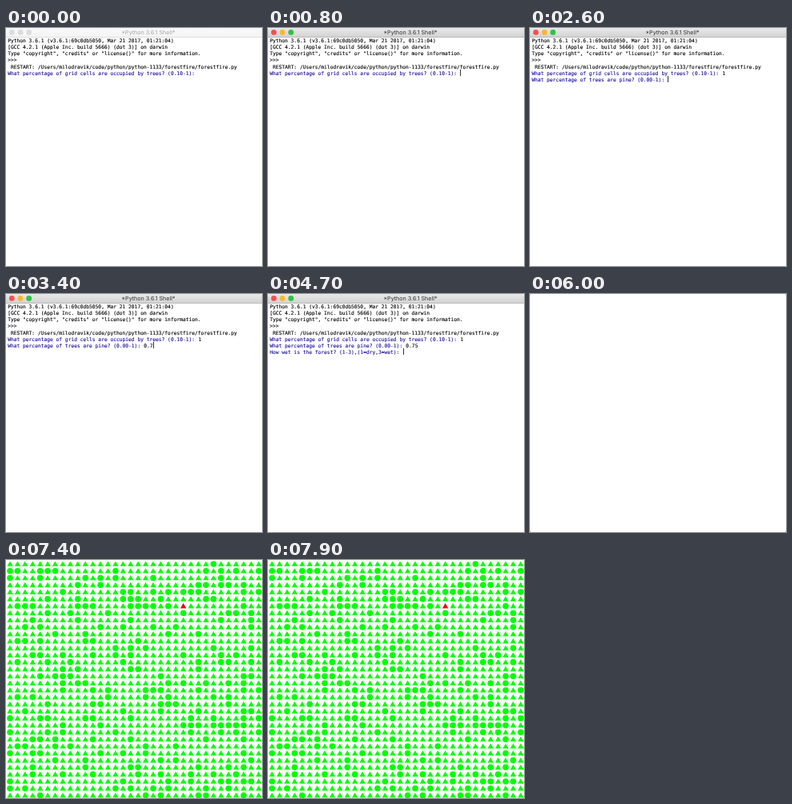
Write an HTML page with a canvas that moves like this. It is 320 by 298 pixels and loops after 8000 ms.

```html
<!DOCTYPE html>
<html lang="en">
<head>
<meta charset="utf-8">
<title>Forest fire</title>
<style>
  html, body { margin: 0; width: 100%; height: 100%; overflow: hidden; background: #fff; }
  canvas, svg { position: absolute; left: 0; top: 0; width: 320px; height: 298px; display: block; }
  text { white-space: pre; text-rendering: geometricPrecision; }
  .mono { font: 6.28px "DejaVu Sans Mono", "Liberation Mono", monospace; stroke-width: 0.12px; }
  .title { font: 7.15px Inter, Roboto, sans-serif; text-anchor: middle; }
</style>
</head>
<body>
<canvas id="stage" width="320" height="298"></canvas>
<svg id="shell" viewBox="0 0 320 298" xmlns="http://www.w3.org/2000/svg"></svg>
<script>
const W = 320, H = 298, LOOP = 8000;
const CHAR = 6.28 * 0.602, LEFT = 2.2, BASE = 18.3, LINE = 8.06;
const FOCUS = 500, CLEAR = 6000, FOREST = 6900;
const INK = "#000", BLUE = "#1a109c", GREEN = "#0f0", FIRE = "#f00014";

const ctx = document.getElementById("stage").getContext("2d");
const shell = document.getElementById("shell");

const banner = [
  "Python 3.6.1 (v3.6.1:69c0db5050, Mar 21 2017, 01:21:04)",
  "[GCC 4.2.1 (Apple Inc. build 5666) (dot 3)] on darwin",
  'Type "copyright", "credits" or "license()" for more information.',
  ">>>",
  " RESTART: /Users/milodravik/code/python/python-1133/forestfire/forestfire.py"
];

// Each prompt appears at `at`; its answer is typed key by key.
const prompts = [
  { at: 0, ask: "What percentage of grid cells are occupied by trees? (0.10-1): ", answer: "1", keys: [1100] },
  { at: 1600, ask: "What percentage of trees are pine? (0.00-1): ", answer: "0.75", keys: [2700, 3000, 3300, 3600] },
  { at: 4200, ask: "How wet is the forest? (1-3),(1=dry,3=wet): ", answer: "2", keys: [5000] },
  { at: 5500, ask: "", answer: "", keys: [] }
];

function addText(str, x, y, cls, fill) {
  const el = document.createElementNS("http://www.w3.org/2000/svg", "text");
  el.setAttribute("x", x);
  el.setAttribute("y", y);
  el.setAttribute("class", cls);
  el.setAttribute("fill", fill);
  if (cls === "mono") el.setAttribute("stroke", fill);
  el.textContent = str;
  shell.appendChild(el);
  return el;
}

const rowY = row => BASE + row * LINE;
const title = addText("*Python 3.6.1 Shell*", 178, 7.9, "title", INK);
banner.forEach((str, i) => addText(str, LEFT, rowY(i), "mono", INK));
prompts.forEach((p, i) => {
  p.y = rowY(banner.length + i);
  p.askEl = addText(p.ask, LEFT, p.y, "mono", BLUE);
  p.answerEl = addText("", LEFT + p.ask.length * CHAR, p.y, "mono", INK);
});

function disc(x, y, r, fill) {
  ctx.fillStyle = fill;
  ctx.beginPath();
  ctx.arc(x, y, r, 0, Math.PI * 2);
  ctx.fill();
}

function pine(x, y, fill) {
  ctx.fillStyle = fill;
  ctx.beginPath();
  ctx.moveTo(x, y - 3.6);
  ctx.lineTo(x + 3.7, y + 2.8);
  ctx.lineTo(x - 3.7, y + 2.8);
  ctx.fill();
}

function drawBar(active) {
  const g = ctx.createLinearGradient(0, 0, 0, 11);
  g.addColorStop(0, active ? "#e9e9e9" : "#f8f8f8");
  g.addColorStop(1, active ? "#d3d3d3" : "#f4f4f4");
  ctx.fillStyle = g;
  ctx.beginPath();
  ctx.roundRect(0, 0, W, 11, [3, 3, 0, 0]);
  ctx.fill();
  ctx.fillStyle = active ? "#b9b9b9" : "#dedede";
  ctx.fillRect(0, 11, W, 1);
  const lights = active ? ["#f9504f", "#f8b830", "#2fc343"] : ["#dcdcdc", "#dcdcdc", "#dcdcdc"];
  lights.forEach((c, i) => disc(7.3 + i * 10.7, 5.4, 3.4, c));
  title.setAttribute("fill", active ? "#333" : "#a8a8a8");
}

function drawShell(t) {
  const active = t >= FOCUS;
  let current, lastKey;
  drawBar(active);
  for (const p of prompts) {
    const shown = t >= p.at;
    p.typed = p.keys.filter(k => t >= k).length;
    p.askEl.style.display = shown ? "" : "none";
    p.answerEl.textContent = p.answer.slice(0, p.typed);
    if (shown) {
      current = p;
      lastKey = p.typed ? p.keys[p.typed - 1] : Math.max(p.at, FOCUS);
    }
  }
  if (active && (t - lastKey) % 900 < 600) {
    const x = LEFT + (current.ask.length + current.typed) * CHAR;
    ctx.fillStyle = "#333";
    ctx.fillRect(Math.round(x), Math.round(current.y - 6.5), 1, 8);
  }
}

function drawBlank() {
  ctx.fillStyle = "#bbb";
  for (const x of [0, W - 1])
    for (const y of [0, H - 1]) ctx.fillRect(x, y, 1, 1);
}

function drawForest() {
  let seed = 1133;
  const rand = () => (seed = seed * 16807 % 2147483647) / 2147483647;
  for (let row = 0; row < 34; row++) {
    for (let col = 0; col < 34; col++) {
      const x = 5 + col * 9.42, y = 5 + row * 8.78;
      const oak = rand() > 0.78;
      const burning = row === 6 && col === 23;
      if (oak && !burning) disc(x, y, 3.8, GREEN);
      else pine(x, y, burning ? FIRE : GREEN);
    }
  }
}

const start = performance.now();

function frame() {
  const t = (performance.now() - start) % LOOP;
  ctx.fillStyle = "#fff";
  ctx.fillRect(0, 0, W, H);
  shell.style.display = t < CLEAR ? "" : "none";
  if (t < CLEAR) drawShell(t);
  else if (t < FOREST) drawBlank();
  else drawForest();
  requestAnimationFrame(frame);
}
frame();
</script>
</body>
</html>
```
